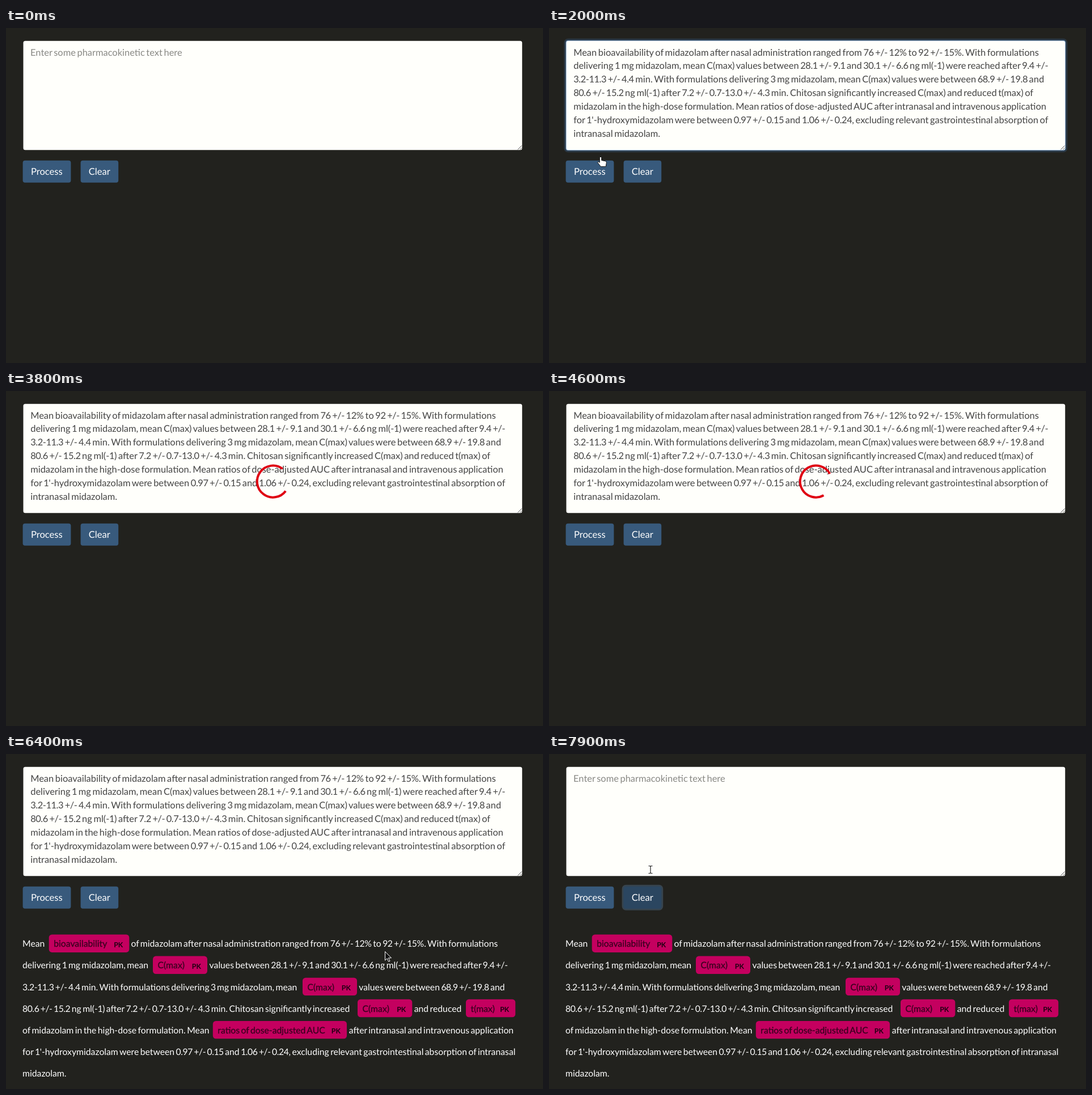
Write an HTML page that moves like this. It is 947 px wide and 591 px high and loops after 8000 ms.

```html
<!DOCTYPE html>
<html lang="en">
<head>
<meta charset="utf-8">
<style>
  html, body { margin: 0; height: 100%; overflow: hidden; background: #22221e; }
  svg { display: block; font-family: Lato, sans-serif; text-rendering: geometricPrecision; word-spacing: -1.6px; }
  .input { font-size: 16.45px; fill: #444; }
  .hint { fill: #888884; }
  .button { font-size: 16.6px; fill: #fff; text-anchor: middle; }
  .result { font-size: 15.75px; fill: #fff; }
  .number { letter-spacing: -.45px; }
  .entity { fill: #3c0020; stroke: #3c0020; stroke-width: .35px; }
  .label { font-size: 12.4px; font-weight: bold; fill: #1c0010; text-anchor: end; }
</style>
</head>
<body>
<svg width="947" height="591" viewBox="0 0 947 591">
  <rect id="areaRing" x="28" y="20.3" width="884.7" height="197.5" rx="5.5" fill="none" stroke="#375a7f" stroke-opacity=".4" stroke-width="3"/>
  <rect id="areaEdge" x="29.5" y="21.8" width="881.7" height="194.5" rx="4" fill="#7399c2"/>
  <rect x="30.5" y="22.8" width="879.7" height="192.5" rx="3.5" fill="#fffffb"/>
  <path d="M902.5 214.5l7-7M906.5 214.5l3-3" stroke="#555" fill="none"/>
  <text id="hint" class="input hint" x="43.1" y="48.5">Enter some pharmacokinetic text here</text>
  <path id="caret" d="M44.5 33v20" stroke="#222"/>
  <g id="typed" class="input"></g>
  <g id="buttons" class="button"></g>
  <g id="result" class="result"></g>
  <circle id="spinner" cx="470.8" cy="159.6" r="28" fill="none" stroke="#df0012" stroke-width="4" pathLength="360" stroke-dasharray="270 90"/>
  <g id="cursor">
    <path id="beam" d="M-3.5 -6.5h2.5l1 1 1-1h2.5M0 -5.5v11M-3.5 6.5h2.5l1-1 1 1h2.5" fill="none" stroke="#222" stroke-width="1.2"/>
    <path id="arrow" d="M.5 .5v15.5l3.6-3.3 2.5 5.6 2.4-1-2.5-5.5h5z" fill="#111" stroke="#fff"/>
    <path id="hand" d="M-1.7 1.2q1.7-2 3.4 0v5.3l6.6 1.3q2 .6 2 2.6l-1 7h-9l-5.7-7.2q.4-2 2.4-.9l1.3 1z" fill="#fff" stroke="#111"/>
  </g>
</svg>
<script>
const $ = id => document.getElementById(id);
const ramp = (t, from, to) => Math.min(1, Math.max(0, (t - from) / (to - from)));
const show = (id, on) => { $(id).style.display = on ? "" : "none"; };
// Figures are set a little tighter than words
const tighten = str => str.replace(/[\d+\/.-]{2,}|\d/g, '<tspan class="number">$&</tspan>');
const text = (x, y, str, cls = "") => `<text x="${x}" y="${y}" class="${cls}">${tighten(str)}</text>`;

const typedLines = [
  "Mean bioavailability of midazolam after nasal administration ranged from 76 +/- 12% to 92 +/- 15%. With formulations",
  "delivering 1 mg midazolam, mean C(max) values between 28.1 +/- 9.1 and 30.1 +/- 6.6 ng ml(-1) were reached after 9.4 +/-",
  "3.2-11.3 +/- 4.4 min. With formulations delivering 3 mg midazolam, mean C(max) values were between 68.9 +/- 19.8 and",
  "80.6 +/- 15.2 ng ml(-1) after 7.2 +/- 0.7-13.0 +/- 4.3 min. Chitosan significantly increased C(max) and reduced t(max) of",
  "midazolam in the high-dose formulation. Mean ratios of dose-adjusted AUC after intranasal and intravenous application",
  "for 1'-hydroxymidazolam were between 0.97 +/- 0.15 and 1.06 +/- 0.24, excluding relevant gastrointestinal absorption of",
  "intranasal midazolam."
];
$("typed").innerHTML = typedLines.map((line, i) => text(43.2, 48.5 + 23.85 * i, line)).join("");

// Result text runs: row, x, words
const runs = [
  [0, 29, "Mean"],
  [0, 220.4, "of midazolam after nasal administration ranged from 76 +/- 12% to 92 +/- 15%. With formulations"],
  [1, 29, "delivering 1 mg midazolam, mean"],
  [1, 358.6, "values between 28.1 +/- 9.1 and 30.1 +/- 6.6 ng ml(-1) were reached after 9.4 +/-"],
  [2, 29, "3.2-11.3 +/- 4.4 min. With formulations delivering 3 mg midazolam, mean"],
  [2, 622.3, "values were between 68.9 +/- 19.8 and"],
  [3, 29, "80.6 +/- 15.2 ng ml(-1) after 7.2 +/- 0.7-13.0 +/- 4.3 min. Chitosan significantly increased"],
  [3, 719.7, "and reduced"],
  [4, 29, "of midazolam in the high-dose formulation. Mean"],
  [4, 604.7, "after intranasal and intravenous application"],
  [5, 29, "for 1'-hydroxymidazolam were between 0.97 +/- 0.15 and 1.06 +/- 0.24, excluding relevant gastrointestinal absorption of intranasal"],
  [6, 29, "midazolam."]
];
// Entity chips: row, left, right, words
const chips = [
  [0, 75.7, 217.3, "bioavailability"], [1, 259, 355, "C(max)"], [2, 523, 619, "C(max)"],
  [3, 620, 716.3, "C(max)"], [3, 811, 898.3, "t(max)"], [4, 364.8, 601, "ratios of dose-adjusted AUC"]
];
const baseline = row => 340.3 + 38.1 * row;
$("result").innerHTML =
  runs.map(([row, x, str]) => text(x, baseline(row), str)).join("") +
  chips.map(([row, left, right, str]) => {
    const y = baseline(row);
    return `<rect x="${left}" y="${y - 21.8}" width="${right - left}" height="31.4" rx="5.3" fill="#c4005f"/>` +
      text(left + 8.5, y, str, "entity") + text(right - 11, y + .3, "PK", "label");
  }).join("");

const button = (id, x, w, name) =>
  `<rect id="${id}Ring" x="${x - 1.5}" y="232.2" width="${w + 3}" height="42" rx="5.5" fill="none" stroke="#557392" stroke-opacity=".42" stroke-width="3"/>` +
  `<rect x="${x}" y="233.7" width="${w}" height="39" rx="4" fill="#385a7c"/>` +
  `<rect id="${id}Dark" x="${x}" y="233.7" width="${w}" height="39" rx="4" fill="#2b4660"/>` +
  text(x + w / 2 - .2, 259, name);
$("buttons").innerHTML = button("process", 29.6, 84.8, "Process") + button("clear", 131.6, 66.6, "Clear");

// Cursor keys: time, shape, x, y
const track = [
  [0, "", 0, 0], [300, "arrow", 235, 1], [400, "beam", 206, 70], [500, "beam", 206, 70],
  [600, "beam", 204, 88], [1500, "beam", 204, 88], [1900, "beam", 105, 208],
  [2000, "hand", 91, 227], [2200, "hand", 77, 254], [2500, "hand", 77, 254], [2600, "", 0, 0],
  [6400, "arrow", 668, 348], [6500, "arrow", 486, 337], [6600, "arrow", 486, 337],
  [6700, "arrow", 400, 312], [6800, "arrow", 260, 275], [6900, "hand", 178, 252],
  [7000, "hand", 165, 247], [7800, "hand", 165, 247], [7900, "beam", 179, 204]
];

function drawCursor(t) {
  const i = track.findLastIndex(key => key[0] <= t);
  const [t0, shape, x0, y0] = track[i];
  const [t1, , x1, y1] = track[i + 1] || [8000, "", x0, y0];
  const k = ramp(t, t0, t1);
  $("cursor").setAttribute("transform", `translate(${x0 + (x1 - x0) * k} ${y0 + (y1 - y0) * k})`);
  for (const name of ["beam", "arrow", "hand"]) show(name, name === shape);
}

function draw(now) {
  const t = Math.floor(now % 8000 / 100) * 100; // the picture changes ten times a second
  const fade = (id, level) => { $(id).style.opacity = level; };
  const hasText = t >= 1400 && t < 7800;

  const focus = ramp(t, 500, 800) - ramp(t, 2200, 2400);
  fade("areaRing", focus);
  fade("areaEdge", focus);
  fade("processRing", ramp(t, 2200, 2400) - ramp(t, 3200, 3500));
  fade("processDark", ramp(t, 2000, 2200) - ramp(t, 3200, 3500));
  fade("clearRing", ramp(t, 7300, 7600));
  fade("clearDark", ramp(t, 6800, 7000));

  show("typed", hasText);
  show("hint", !hasText);
  show("caret", t >= 600 && t < 1400);
  show("result", t >= 5100);
  show("spinner", t >= 2400 && t < 5100);
  const angle = 61 + (t - 3100) * .48; // one turn in 750 ms
  $("spinner").setAttribute("transform", `rotate(${angle} 470.8 159.6)`);
  drawCursor(t);
  requestAnimationFrame(draw);
}
requestAnimationFrame(draw);
</script>
</body>
</html>
```
